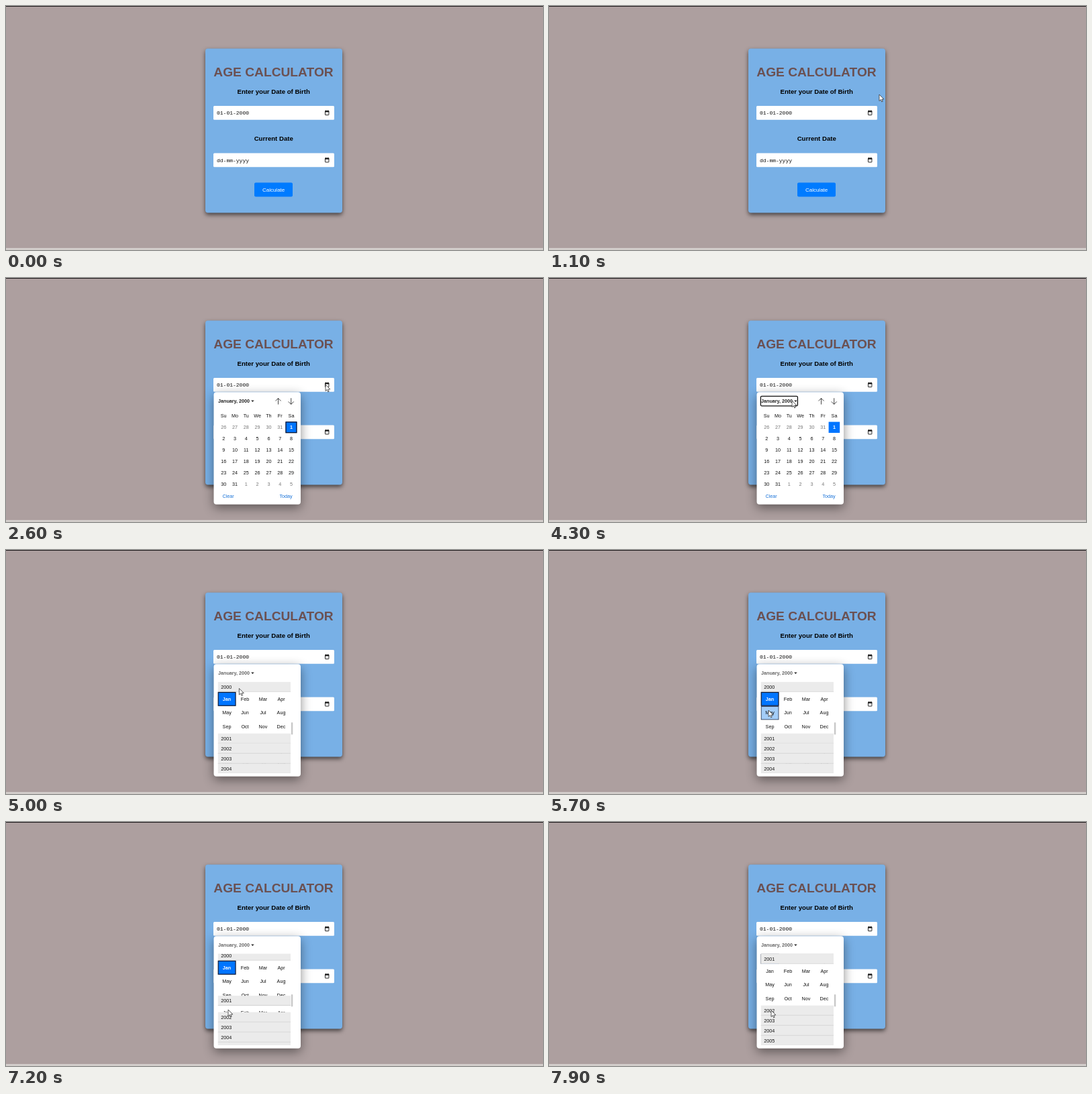
Write an HTML page that moves like this. It is 800 px wide and 364 px high and loops after 8000 ms.

```html
<!DOCTYPE html>
<html lang="en">
<head>
<meta charset="utf-8">
<title>Age calculator</title>
<style>
  html, body { margin: 0; width: 100%; height: 100%; overflow: hidden; background: #ad9f9f; }
  svg { display: block; width: 800px; height: 364px; }
  text { font: 7.2px "Liberation Sans", Arial, sans-serif; fill: #111; text-anchor: middle; white-space: pre; }
  .title { font-size: 19.2px; font-weight: bold; fill: #6b5153; }
  .label { font-size: 9.6px; font-weight: bold; fill: #000; }
  .mono { font: 8px "Liberation Mono", "DejaVu Sans Mono", monospace; text-anchor: start; }
  .button { font-size: 8px; fill: #fff; }
  .left { text-anchor: start; }
  .month { font-weight: bold; text-anchor: start; }
  .dim { fill: #777; }
  .link { fill: #1a73d8; }
  .picked { fill: #fff; font-weight: bold; }
  .card { filter: drop-shadow(0 3px 3px rgba(0, 0, 0, .6)); }
  .popup { filter: drop-shadow(0 5px 8px rgba(0, 0, 0, .45)); }
</style>
</head>
<body>
<svg id="stage" viewBox="0 0 800 364">
  <clipPath id="listClip"><rect x="315" y="196.5" width="109" height="136.5"/></clipPath>
</svg>
<script>
const LOOP = 8000;
const OPEN = 2200, FOCUS = 4000, LIST = 4700, EXPAND = 7100, EXPAND_TIME = 300;
const LIST_TOP = 196.7, HEAD = 15, BODY = 62, CELL_W = 27, CELL_H = 20.5;
const BLUE = '#0075ff';
const MONTHS = 'Jan Feb Mar Apr May Jun Jul Aug Sep Oct Nov Dec'.split(' ');

// Pointer tip: time, x, y
const PATH = [
  [800, 588, 62], [1000, 507, 116], [1100, 492, 132], [1900, 476, 159],
  [2700, 476, 159], [3700, 362, 183], [4600, 362, 183], [5500, 327, 239],
  [6300, 327, 239], [6900, 331, 280], [7300, 331, 280], [7700, 331, 281]
];

const stage = document.getElementById('stage');

function add(parent, tag, attrs = {}, content = '') {
  const node = document.createElementNS('http://www.w3.org/2000/svg', tag);
  for (const key in attrs) node.setAttribute(key, attrs[key]);
  node.textContent = content;
  return parent.appendChild(node);
}
const group = (parent, attrs) => add(parent, 'g', attrs);
const rect = (parent, x, y, width, height, fill, more) =>
  add(parent, 'rect', { x, y, width, height, fill, ...more });
const text = (parent, x, y, content, kind = '') => add(parent, 'text', { x, y, class: kind }, content);
const line = (parent, d, stroke, width) =>
  add(parent, 'path', { d, stroke, 'stroke-width': width, fill: 'none' });
const show = (node, on) => node.setAttribute('visibility', on ? 'inherit' : 'hidden');
const move = (node, x, y) => node.setAttribute('transform', `translate(${x} ${y})`);

function dateField(y, value) {
  rect(stage, 309, y, 180, 20.8, '#fff', { rx: 1.5 });
  text(stage, 314, y + 13.2, value, 'mono');
  rect(stage, 475.5, y + 7.8, 5.4, 5.8, 'none', { stroke: '#111', 'stroke-width': .9, rx: .4 });
  rect(stage, 475.2, y + 7.4, 6, 1.9, '#111');
  line(stage, `M476.6 ${y + 6.4}v1.5M479.8 ${y + 6.4}v1.5`, '#111', .9);
}

function buildPage() {
  rect(stage, 0, 0, 800, 364, '#ad9f9f');
  rect(stage, 0, 0, 800, 1, '#1d1a1b');
  rect(stage, 0, 361, 800, 3, '#d2cdca');
  rect(stage, 297, 63.5, 204, 245, '#78b0e6', { rx: 4, class: 'card' });
  text(stage, 398.5, 105.4, 'AGE CALCULATOR', 'title');
  text(stage, 398.7, 130.6, 'Enter your Date of Birth', 'label');
  dateField(149, '01-01-2000');
  text(stage, 398.7, 201, 'Current Date', 'label');
  dateField(219.4, 'dd-mm-yyyy');
  rect(stage, 370, 263.6, 57, 21, '#007bff', { rx: 2 });
  text(stage, 398.6, 276.8, 'Calculate', 'button');
}

function buildDays(parent) {
  const days = group(parent);
  line(days, 'M405.5 188.6v-9.2M401.5 183.4l4-4 4 4M424.7 179.2v9.2M420.7 184.4l4 4 4-4', '#333', .9);
  rect(days, 416.6, 214.6, 16.6, 16.4, BLUE);
  const place = (i, row, label, kind) => text(days, 324.2 + i * 16.8, 208.4 + row * 16.85, label, kind);
  'Su Mo Tu We Th Fr Sa'.split(' ').forEach((name, i) => place(i, 0, name));
  for (let i = 0; i < 42; i++) {
    const day = i - 5;
    const inside = day > 0 && day < 32;
    const kind = day === 1 ? 'picked' : inside ? '' : 'dim';
    place(i % 7, 1 + Math.floor(i / 7), inside ? day : day < 1 ? day + 31 : day - 31, kind);
  }
  text(days, 331, 328.2, 'Clear', 'link');
  text(days, 417, 328.2, 'Today', 'link');
  return days;
}

function buildMonths(parent, first) {
  const body = group(parent);
  rect(body, 315, 0, 109, BODY, '#fff');
  if (first) {
    rect(body, 316.2, .7, 25.8, 19.8, BLUE, { stroke: '#0a1530', 'stroke-width': 1.2 });
    body.hover = rect(body, 0, 0, 25.8, 19.4, '#a3cdf8', { stroke: '#1c2c48', 'stroke-width': .8 });
  }
  MONTHS.forEach((name, i) => text(body, 329 + i % 4 * CELL_W,
    13.2 + Math.floor(i / 4) * CELL_H, name, first && !i ? 'picked' : ''));
  return body;
}

function buildYear(parent, year) {
  const head = group(parent);
  rect(head, 315.8, 0, 108.2, HEAD, '#ebebeb');
  rect(head, 315.8, HEAD - .8, 108.2, .8, '#c6c6c6');
  text(head, 320.3, 9.9, year, 'left');
  return head;
}

buildPage();
const popup = group(stage);
rect(popup, 309.5, 170.3, 129.5, 167.5, '#fff', { rx: 4, class: 'popup' });
const month = text(popup, 316, 186, 'January, 2000', 'month');
add(popup, 'path', { d: 'M365.2 182.4h4.4l-2.2 2.5z', fill: '#222' });
const days = buildDays(popup);
const dayRing = rect(days, 417, 214.9, 15.9, 15.8, 'none', { stroke: '#0a1530', 'stroke-width': 1.3 });
const monthRing = rect(days, 315.4, 176.4, 55, 14.4, 'none', { stroke: '#111', 'stroke-width': 1.3, rx: 1.5 });

const list = group(popup);
const years = group(list, { 'clip-path': 'url(#listClip)' });
rect(list, 424.8, 257.3, 2.5, 18, '#c9c9c9');
// Later rows paint over earlier ones, which hides folded months.
const rows = [2000, 2001, 2002, 2003, 2004, 2005].map((year, i) => ({
  head: buildYear(years, year),
  body: i < 2 ? buildMonths(years, i === 0) : null
}));

const pointer = add(stage, 'path', {
  d: 'M0 0V9.6L2.2 7.5 3.7 10.9 5.2 10.2 3.8 7H6.9Z',
  fill: '#fff', stroke: '#333', 'stroke-width': .8, 'stroke-linejoin': 'round'
});

function pointerAt(t) {
  const i = PATH.findIndex(p => p[0] > t);
  if (i < 0) return PATH[PATH.length - 1].slice(1);
  if (i === 0) return [0, 0];
  const [a, b] = [PATH[i - 1], PATH[i]];
  const k = (t - a[0]) / (b[0] - a[0]);
  const ease = t < 1900 ? k : k * k * (3 - 2 * k);
  return [1, 2].map(n => a[n] + (b[n] - a[n]) * ease);
}

function drawList(t, x, y) {
  const q = Math.min(1, Math.max(0, (t - EXPAND) / EXPAND_TIME));
  const grow = q < .5 ? 4 * q ** 3 : 1 - 4 * (1 - q) ** 3;
  let top = LIST_TOP - HEAD * q;
  rows.forEach(({ head, body }, i) => {
    move(head, 0, top);
    top += HEAD;
    if (body) {
      move(body, 0, top);
      top += BODY * (i ? grow : 1 - grow);
    }
  });

  const col = Math.floor((x - 315.7) / CELL_W);
  const row = Math.floor((y - LIST_TOP - HEAD) / CELL_H);
  const hover = rows[0].body.hover;
  show(hover, t < EXPAND && col >= 0 && col < 4 && row >= 0 && row < 3 && col + row > 0);
  move(hover, 316.2 + col * CELL_W, 1.3 + row * CELL_H);
}

function draw(t) {
  const [x, y] = pointerAt(t);
  const listOpen = t >= LIST;
  show(pointer, t >= PATH[0][0]);
  move(pointer, x, y);
  show(popup, t >= OPEN);
  show(days, !listOpen);
  show(list, listOpen);
  month.style.fill = listOpen ? '#666' : '#222';
  show(dayRing, t < FOCUS);
  show(monthRing, t >= FOCUS);
  if (listOpen) drawList(t, x, y);
  else show(rows[0].body.hover, false);
}

const start = performance.now();
function frame() {
  draw((performance.now() - start) % LOOP);
  requestAnimationFrame(frame);
}
frame();
</script>
</body>
</html>
```
